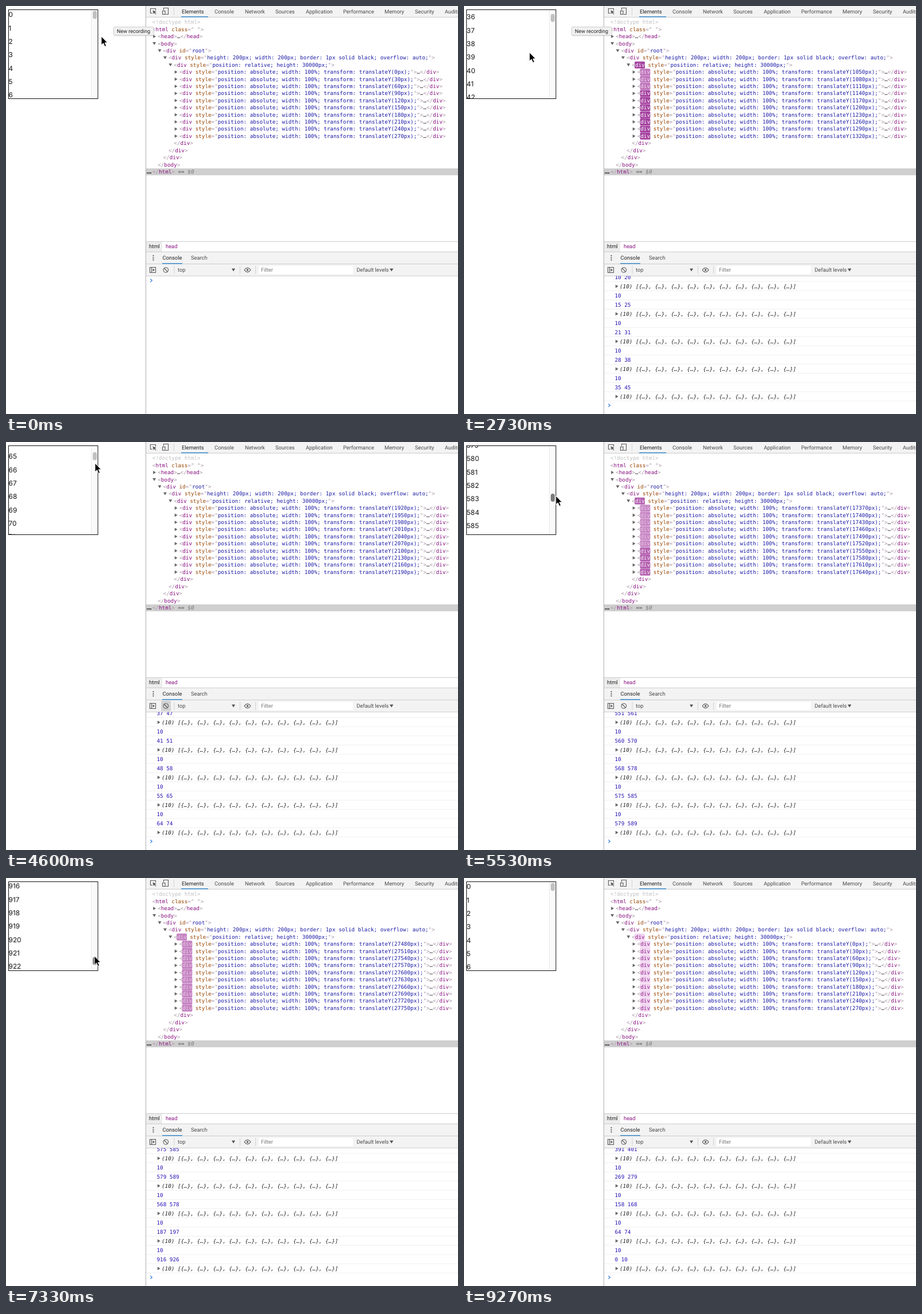
An HTML page for the animation above (9.34 s loop, 787x711 px).

```html
<!DOCTYPE html>
<html lang="en">
<head>
<meta charset="utf-8">
<title>Virtual list</title>
<style>
  html, body { margin: 0; width: 100%; height: 100%; overflow: hidden; background: #fff; }
  svg { display: block; }
  text { white-space: pre; text-rendering: geometricPrecision; }
  .ui { font: 9.32px Roboto, "Liberation Sans", sans-serif; fill: #4a4a4a; }
  .code { font: 9.29px "DejaVu Sans Mono", "Liberation Mono", monospace; fill: #222; }
  .num { font: 11.8px Inter, "Liberation Sans", sans-serif; fill: #111; }
  .p { fill: #a894a6; }
  .t { fill: #881280; }
  .a { fill: #994500; }
  .v { fill: #1a1aa6; }
  .log { fill: #2412b4; }
  .dark { fill: #222; }
  .dim { fill: #777; }
  .faint { fill: #c0c0c0; }
  .it { font-style: italic; }
  .icon { fill: none; stroke: #5a5a5a; stroke-width: 1.1; }
  .solid { fill: #5a5a5a; stroke: none; }
</style>
</head>
<body>
<svg width="787" height="711" viewBox="0 0 787 711">
  <defs>
    <clipPath id="listClip"><rect x="4.5" y="6.5" width="144" height="155"/></clipPath>
    <clipPath id="logClip"><rect x="244" y="470.5" width="543" height="241"/></clipPath>
  </defs>
  <rect width="787" height="711" fill="#fff"/>

  <rect x="148" y="6" width="12" height="155" fill="#fafafa"/>
  <path d="M148.5 6V161" stroke="#e9e9e9"/>
  <g id="list" class="num" clip-path="url(#listClip)"></g>
  <rect id="thumb" x="151" width="7" height="14" rx="3.5"/>
  <rect x="4.5" y="6.5" width="155.500" height="155" fill="none" stroke="#111"/>

  <rect x="244" width="543" height="19" fill="#f3f3f3"/>
  <rect x="244" y="429" width="543" height="41" fill="#f3f3f3"/>
  <rect x="244" y="283" width="543" height="12" fill="#cfcfcf"/>
  <rect x="244" y="411" width="28" height="17" fill="#ececec"/>
  <path d="M244 19.5H787M244 410.5H787M244 428.5H787M244 449.5H787M244 470.5H787" stroke="#cdcdcd"/>
  <path d="M243.5 0V711" stroke="#b0b0b0"/>
  <path d="M292.5 3V16M293 453V467M407.5 453V467M434.5 453V467" stroke="#d2d2d2"/>
  <path d="M305 18.7H352M272 448.7H307" stroke="#3e8fd0" stroke-width="1.6"/>
  <rect id="hover" x="270" y="451" width="17" height="18" fill="#d3d3d3"/>
  <rect x="440" y="453" width="164" height="14" fill="#fff"/>
  <g class="icon">
    <path d="M255 12.5H251.5V4.5H260.5V8"/>
    <path class="solid" d="M255.5 7.5L262 10.3L259.3 11.2L261.5 14L260.5 14.8L258.3 12L256.7 14Z"/>
    <path d="M274.5 7V3.5H282.5V14.5H278"/>
    <rect x="272.5" y="8.5" width="4.5" height="6"/>
    <rect x="250.5" y="455.5" width="10" height="9"/>
    <path d="M253.5 455V465"/>
    <path class="solid" d="M255.5 457.5L259 460L255.5 462.5Z"/>
    <circle cx="278.3" cy="460" r="4.3"/>
    <path d="M275.3 457L281.3 463"/>
    <path d="M415 460Q420.5 452.5 426 460Q420.5 467.5 415 460Z"/>
    <circle cx="420.5" cy="460" r="1.7" class="solid"/>
  </g>
  <path d="M256.5 434.2v2m0 1.7v2m0 1.7v2" stroke="#555" stroke-width="1.9"/>
  <path d="M393 457.5h6l-3 5zM668 457.5h6.5l-3.25 5z" fill="#555"/>

  <g id="labels" class="ui"></g>
  <g id="tree" class="code"></g>
  <g id="rows" class="code"></g>
  <g id="console" class="code" clip-path="url(#logClip)"></g>

  <g id="tooltip">
    <rect x="187.5" y="37.5" width="70" height="15" rx="2" opacity=".12"/>
    <rect x="187.5" y="36.5" width="69.5" height="14.5" rx="1.5" fill="#f1f1f1" stroke="#cfcfcf"/>
    <text x="193" y="47.2" class="ui dark" style="font-size:9px">New recording</text>
  </g>
  <path id="cursor" d="M0 0V15L3.5 11.8L6 17.6L8.6 16.5L6.1 10.9H10.6Z" stroke="#fff" stroke-width=".9"/>
</svg>
<script>
const LOOP = 9340, TICK = 130, FIRST_TICK = 110;
const ITEM = 23.35, CHAR = 5.593, ROW = 12.41, GROUP = 48;
const GRAB = 4740, RELEASE = 8430;
const $ = id => document.getElementById(id);

const easeIn = p => u => u ** p;
const easeOut = p => u => 1 - (1 - u) ** p;
const smooth = u => u * u * (3 - 2 * u);

// Each move: start, end, destination, easing
const SCROLL = [
  [1540, 2715, [35.83], easeIn(2)],      // wheel
  [2748, 3360, [64.57], easeIn(1.55)],
  [GRAB, 4920, [551.4], smooth],         // thumb drag
  [4920, 5440, [579.4], easeOut(1.35)],
  [5600, 5700, [568.2], smooth],
  [6390, 6480, [187.3], smooth],
  [7040, 7130, [916.04], smooth],
  [7430, RELEASE, [0], easeOut(1.3)]
];
const POINTER = [
  [700, 1300, [117, 82], smooth],
  [2000, 2700, [114, 81], smooth],
  [3750, 4130, [277, 456], smooth],
  [4330, 4600, [155, 37], smooth],
  [4600, GRAB, [160, 30], smooth],
  [7040, 7130, [154, 22], smooth],
  [RELEASE, 8570, [158, -20], smooth]
];

const mix = (a, b, k) => a + (b - a) * k;

function travel(origin, moves, t) {
  let at = origin;
  for (const [start, end, to, ease] of moves) {
    if (t <= start) break;
    const k = ease(Math.min(1, (t - start) / (end - start)));
    at = at.map((v, i) => mix(v, to[i], k));
  }
  return at;
}
const scrollAt = t => travel([0], SCROLL, t)[0];

// Every tick that finds the list moved logs the first rendered item; the top rows stay rendered.
const LOGS = [];
for (let t = FIRST_TICK; t < LOOP; t += TICK) {
  const s = scrollAt(t);
  if (s !== scrollAt(t - TICK)) LOGS.push({ time: t, start: s < 6 ? 0 : Math.floor(s) });
}

const setHtml = (el, html) => { if (el.last !== html) el.innerHTML = el.last = html; };
const text = (x, y, body, cls = "") => `<text x="${x}" y="${y.toFixed(2)}" class="${cls}">${body}</text>`;
const span = (cls, body, style = "") => `<tspan class="${cls}" style="${style}">${body}</tspan>`;
const open = (tag, attr, value, style) => span("p", "&lt;") + span("t", tag, style) +
  (attr ? " " + span("a", attr) + span("p", '="') + span("v", value) + span("p", '"') : "") + span("p", "&gt;");
const close = tag => span("p", "&lt;/") + span("t", tag) + span("p", "&gt;");
const treeY = line => 31.3 + line * ROW;
const indent = level => 254.8 + level * 9.38;
const arrowDown = (x, y) => `<path d="M${x - 9} ${y - 5.5}h6l-3 5z" fill="#666"/>`;
const arrowRight = (x, y) => `<path d="M${x - 8} ${y - 6}l4.8 2.9l-4.8 2.9z" fill="#666"/>`;

// cubic-bezier(0, 0, .2, 1)
function decelerate(x) {
  let lo = 0, hi = 1;
  for (let i = 0; i < 18; i++) {
    const u = (lo + hi) / 2;
    if (0.6 * u * u * (1 - u) + u * u * u < x) lo = u; else hi = u;
  }
  return smooth(lo);
}

function flash(age) {
  if (age >= 1400) return null;
  const k = decelerate(Math.min(1, age / 1120));
  const blend = (a, b, k) => `rgb(${a.map((v, i) => Math.round(mix(v, b[i], k)))})`;
  return {
    back: blend([158, 54, 153], [245, 219, 244], k),
    ink: blend([255, 255, 255], [136, 18, 128], k * k),
    alpha: age < 1120 ? 1 : 1 - decelerate((age - 1120) / 280)
  };
}

function divLine(line, level, style, age, tail = "") {
  const x = indent(level), y = treeY(line), f = flash(age);
  const mark = f ? `<rect x="${x + CHAR - 0.8}" y="${y - 9}" width="17.8" height="12" rx="1.5" fill="${f.back}" opacity="${f.alpha}"/>` : "";
  return mark + (tail ? arrowRight : arrowDown)(x, y) +
    text(x, y, open("div", "style", style, f ? `fill:${f.ink}` : "") + tail);
}

function buildStatic() {
  const tabs = { Elements: 306, Console: 363, Network: 416, Sources: 469, Application: 522,
    Performance: 587, Memory: 659, Security: 712, Audits: 764 };
  $("labels").innerHTML =
    Object.entries(tabs).map(([name, x]) => text(x, 12.6, name, x === 306 ? "dark" : "")).join("") +
    text(249, 422.3, "html", "dark") + text(278, 422.3, "head", "t") +
    text(272.5, 442, "Console", "dark") + text(322, 442, "Search") +
    text(299, 463.2, "top") + text(444, 463.2, "Filter", "dim") + text(610.5, 463.2, "Default levels");

  const at = (line, level, body, arrow) =>
    (arrow ? arrow(indent(level), treeY(line)) : "") + text(indent(level), treeY(line), body);
  $("tree").innerHTML =
    at(0, 0, span("faint", "&lt;!doctype html&gt;")) +
    at(1, 0, open("html", "class", " ")) +
    at(2, 1, open("head") + "…" + close("head"), arrowRight) +
    at(3, 1, open("body"), arrowDown) +
    at(4, 2, open("div", "id", "root"), arrowDown) +
    divLine(5, 3, "height: 200px; width: 200px; border: 1px solid black; overflow: auto;", Infinity) +
    [4, 3, 2].map((level, i) => at(17 + i, level, close("div"))).join("") +
    at(20, 1, close("body")) +
    text(245, treeY(21), span("", "…", "font-size:14px")) +
    at(21, 0, close("html") + span("", " == ", "fill:#555") + span("it dim", "$0"));
}

function drawList(scroll) {
  let html = "";
  const first = Math.floor(scroll);
  for (let i = first; i < Math.min(1000, first + 8); i++)
    html += text(4.6, 19.3 + (i - scroll) * ITEM, i);
  setHtml($("list"), html);
}

// An item keeps its node, and so its flash, while it stays in the rendered window.
function bornAt(item, logs) {
  let born = -Infinity;
  for (const { time, start } of [...logs].reverse()) {
    if (item < start || item > start + 9) return born;
    born = time;
  }
  return item < 10 ? -Infinity : born;
}

function drawRows(t, logs) {
  const start = logs.length ? logs[logs.length - 1].start : 0;
  const changes = logs.filter((log, i) => i && log.start !== logs[i - 1].start);
  const changed = changes.length ? changes[changes.length - 1].time : -Infinity;
  let html = divLine(6, 4, "position: relative; height: 30000px;", t - changed);
  for (let i = 0; i < 10; i++) {
    const item = start + i;
    html += divLine(7 + i, 5, `position: absolute; width: 100%; transform: translateY(${item * 30}px);`,
      t - bornAt(item, logs), "…" + close("div"));
  }
  setHtml($("rows"), html);
}

function drawConsole(logs) {
  const n = logs.length, array = `(10) [${Array(10).fill("{…}").join(", ")}]`;
  const top = Math.min(471, 640.6 - GROUP * (n - 1));
  let html = "";
  for (let g = Math.max(0, n - 5); g < n; g++) {
    const y = top + g * GROUP, start = logs[g].start;
    html += text(262.5, y + 11.3, "10", "log") +
      text(262.5, y + 27, `${start} ${start + 10}`, "log") +
      arrowRight(271.8, y + 43) + text(271, y + 43.2, array, "it") +
      [15.5, 31.5, 47.5].map(d => `<path d="M244 ${y + d}H787" stroke="#efefef"/>`).join("");
  }
  const promptY = top + n * GROUP + 4.6;
  html += `<path d="M251.3 ${promptY}l3 2.7l-3 2.7" fill="none" stroke="#3b83e0" stroke-width="1.3"/>`;
  setHtml($("console"), html);
}

function render(t) {
  const scroll = scrollAt(t);
  const logs = LOGS.filter(log => log.time <= t);
  const dragging = t > GRAB && t < RELEASE;
  const [x, y] = travel([166, 53], POINTER, t);
  drawList(scroll);
  drawRows(t, logs);
  drawConsole(logs);
  $("thumb").setAttribute("y", 8.6 + scroll * 0.1407);
  $("thumb").setAttribute("fill", dragging ? "#7d7d7d" : "#c1c1c1");
  $("hover").setAttribute("opacity", t > 4100 && t < 4660 ? 1 : 0);
  $("tooltip").setAttribute("opacity", t < 3700 ? 1 : 0);
  $("cursor").setAttribute("transform", `translate(${x} ${dragging ? 21.6 + scroll * 0.125 : y})`);
}

buildStatic();
const begin = performance.now();
function tick() {
  render((performance.now() - begin) % LOOP);
  requestAnimationFrame(tick);
}
tick();
</script>
</body>
</html>
```
